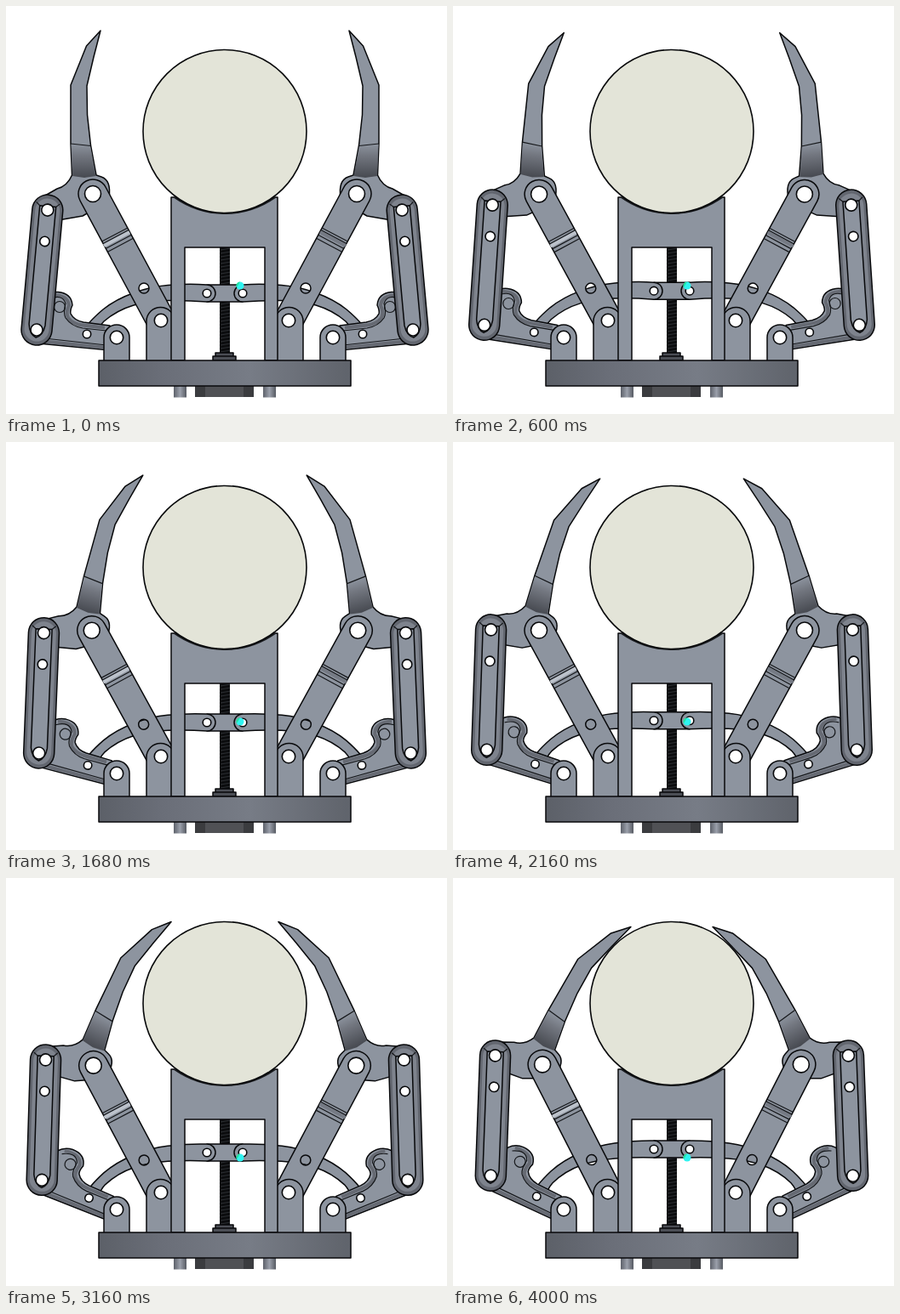
An HTML page for the animation above (4.04 s loop, 518 by 480 pixels).

```html
<!DOCTYPE html>
<html lang="en">
<head>
<meta charset="utf-8">
<title>Gripper linkage</title>
<style>
  html, body { margin: 0; width: 100%; height: 100%; overflow: hidden; background: #fff; }
  svg { display: block; width: 518px; height: 480px; }
  .part { fill: #8d949f; stroke: #08090b; stroke-width: 1.5; stroke-linejoin: round; }
  .hole { fill: #fff; stroke: #08090b; stroke-width: 1.6; }
  .edge { fill: none; stroke: #15171a; stroke-width: 1.2; }
  .fillet { fill: none; stroke: #666a73; stroke-width: 4; }
  .shine { fill: none; stroke: var(--shine, #bcc2cb); stroke-width: 4; }
  .rod { fill: none; stroke-linecap: round; }
</style>
</head>
<body>
<svg viewBox="0 0 518 480">
  <defs>
    <linearGradient id="disc">
      <stop offset="0" stop-color="#5c6068"/>
      <stop offset=".25" stop-color="#6a6e78"/>
      <stop offset=".6" stop-color="#777c86"/>
      <stop offset="1" stop-color="#5f636b"/>
    </linearGradient>
    <linearGradient id="foot">
      <stop offset="0" stop-color="#5d616a"/>
      <stop offset=".5" stop-color="#9a9faa"/>
      <stop offset="1" stop-color="#565a62"/>
    </linearGradient>
    <linearGradient id="bend" gradientUnits="userSpaceOnUse" x1="0" y1="162" x2="0" y2="201">
      <stop offset="0" stop-color="#8d949f"/>
      <stop offset=".35" stop-color="#737780"/>
      <stop offset="1" stop-color="#484b52"/>
    </linearGradient>
    <pattern id="thread" width="12" height="4" patternUnits="userSpaceOnUse">
      <rect width="12" height="4" fill="#0b0c0e"/>
      <path d="M0 3L12 1" stroke="#33363b" stroke-width=".8"/>
    </pattern>
  </defs>

  <rect x="251" y="283" width="12" height="128" fill="url(#thread)"/>
  <g class="part">
    <rect x="246" y="408" width="21" height="5" fill="#4b4e55"/>
    <rect x="243" y="412" width="27" height="5" fill="#4b4e55"/>
  </g>
  <rect id="block" class="part" x="236" y="-10" width="42" height="20"/>

  <g id="side">
    <!-- curved drive link -->
    <g id="link">
      <path class="part" d="M90 384Q94 374 114 357Q129 345 150 337.500Q170 330 190 328.500Q214 326.500 236 328A10 10 0 0 1 236 348Q212 346 190 346.500Q168 347 150 352Q130 358 115 371Q109 377 106 386Z"/>
    </g>
    <!-- bell crank -->
    <g id="crank">
      <path class="part" d="M122 405L38 397L28 380L44 343Q51 336 61 336.500Q77 338 78 352Q75 358 76 362Q80 370 91 372L122 376Z"/>
      <path class="fillet" d="M52 340.500Q72 339 74 352Q70 361 73 367Q78 374 90 375.500L116 378.500M118 402L44 394.500"/>
      <path class="edge" d="M50 345Q66 338 70 350Q67 361 70 367Q77 377 90 379L118 382M118 399L50 391.500"/>
      <circle class="edge" cx="63" cy="354" r="6.500"/>
      <circle class="hole" cx="95" cy="386" r="4.700"/>
    </g>
    <!-- finger -->
    <g id="finger">
      <path class="part" d="M111 29L94.500 47L76 93L76 162L77.500 199Q72 212 60 215L46 223L46 250L64 251.500L90 247L102 240L121 226Q124 205 112 201L106 199L99.500 164L95.500 128L95 94L103 60Z"/>
      <path d="M76.500 162.500L99 164.500L105.500 200L92 202L78 200Z" fill="url(#bend)"/>
      <path class="edge" d="M76 162L99.500 164.500"/>
    </g>
    <!-- main arm -->
    <g id="arm">
      <path class="part" fill-rule="evenodd" d="M87 229A17 17 0 1 1 117 213L197 362L167 378ZM168 332a6 6 0 1 0 -12 0a6 6 0 1 0 12 0Z"/>
      <path class="shine" d="M115 282L145 266"/>
      <path class="edge" d="M112.500 277L143 261M114 279.500L144 263.500M117 285.500L147 269.500M119 289.500L149 273.500"/>
      <circle class="hole" cx="102" cy="221" r="9.500"/>
    </g>
    <!-- outer rod -->
    <g id="rod">
      <g class="rod">
        <path d="M0 0V-141.500" stroke="#08090b" stroke-width="37.500"/>
        <path d="M0 0V-141.500" stroke="#62666f" stroke-width="34.500"/>
        <path d="M0 -1V-140.500" stroke="#7e838d" stroke-width="29"/>
      </g>
      <path class="part" d="M-9.500 -6V-146H9.500V-6Q8 6 0 9Q-8 6 -9.500 -6Z"/>
      <path class="edge" d="M-9.500 -146L-14 -150M9.500 -146L14 -150"/>
      <circle class="hole" r="7"/>
      <circle class="hole" cy="-104.500" r="5.700"/>
      <circle class="hole" cy="-141.500" r="7"/>
    </g>
    <!-- fixed lugs -->
    <path class="part" d="M165 418V371A16.500 16.500 0 0 1 198 371V418Z"/>
    <circle class="hole" cx="182" cy="370" r="7.700"/>
    <path class="part" d="M115 418V390A15 15 0 0 1 145 390V418Z"/>
    <circle class="hole" cx="130" cy="390" r="7.700"/>
    <circle id="pin" class="hole" cx="236" r="4.800"/>
  </g>
  <use href="#side" transform="matrix(-1 0 0 1 514 0)" style="--shine:#757a84"/>

  <path class="part" d="M194 225H319V417H304V284H210V417H194Z"/>
  <path d="M196 225Q224 245 257 245Q290 245 318 225Z" fill="#17191c"/>
  <circle cx="257" cy="147.500" r="96" fill="#e3e4d8" stroke="#08090b" stroke-width="1.600"/>

  <rect x="222" y="447" width="69" height="13" fill="#3b3c3f"/>
  <rect x="234" y="447" width="45" height="13" fill="#505155"/>
  <rect x="197" y="447" width="15" height="13.500" fill="url(#foot)"/>
  <rect x="302" y="447" width="15" height="13.500" fill="url(#foot)"/>
  <rect class="part" x="109" y="417" width="296" height="30" style="fill:url(#disc)"/>

  <circle cx="275" cy="329" r="4.500" fill="#2ff3f0"/>
  <path d="M271 331A4.500 4.500 0 0 1 275 324.500Z" fill="#22e39a"/>
</svg>

<script>
  const LOOP = 4040, STEP = 40, DEG = Math.PI / 180;
  const el = id => document.getElementById(id);
  const [block, link, crank, finger, arm, rod, pin] =
    ['block', 'link', 'crank', 'finger', 'arm', 'rod', 'pin'].map(el);
  const move = (node, value) => node.setAttribute('transform', value);

  const armBase = [182, 370], crankBase = [130, 390], elbow = [102, 221];

  // rotate a point by a degrees around a centre
  function turn([x, y], a, [cx, cy]) {
    const c = Math.cos(a * DEG), s = Math.sin(a * DEG), dx = x - cx, dy = y - cy;
    return [cx + dx * c - dy * s, cy + dx * s + dy * c];
  }
  const heading = (p, q) => Math.atan2(q[1] - p[1], q[0] - p[0]) / DEG;
  const linkRest = heading([95, 386], [236, 338]);

  function pose(t) {
    const fingerTurn = 10.52 * t - 0.755 * t * t;
    const crankTurn = 5.98 * t - 0.283 * t * t;
    const armTurn = -0.724 * t + 0.256 * t * t;
    const slide = 338 - 4.75 * t;

    const top = turn(elbow, armTurn, armBase);
    const shift = [top[0] - elbow[0], top[1] - elbow[1]];
    const upper = turn([48.8, 240], fingerTurn, elbow).map((v, i) => v + shift[i]);
    const lower = turn([36, 381], crankTurn, crankBase);
    const joint = turn([95, 386], crankTurn, crankBase);
    const linkTurn = heading(joint, [236, slide]) - linkRest;

    move(arm, `rotate(${armTurn} ${armBase})`);
    move(crank, `rotate(${crankTurn} ${crankBase})`);
    move(finger, `translate(${shift}) rotate(${fingerTurn} ${elbow})`);
    move(rod, `translate(${lower}) rotate(${heading(lower, upper) + 90})`);
    move(link, `translate(0 ${slide - 338}) rotate(${linkTurn} 236 338)`);
    move(block, `translate(0 ${slide})`);
    move(pin, `translate(0 ${slide})`);
  }

  const start = performance.now();
  function tick() {
    const ms = Math.max(0, performance.now() - start) % LOOP;
    pose(Math.floor(ms / STEP) * STEP / 1000);
    requestAnimationFrame(tick);
  }
  tick();
</script>
</body>
</html>
```
